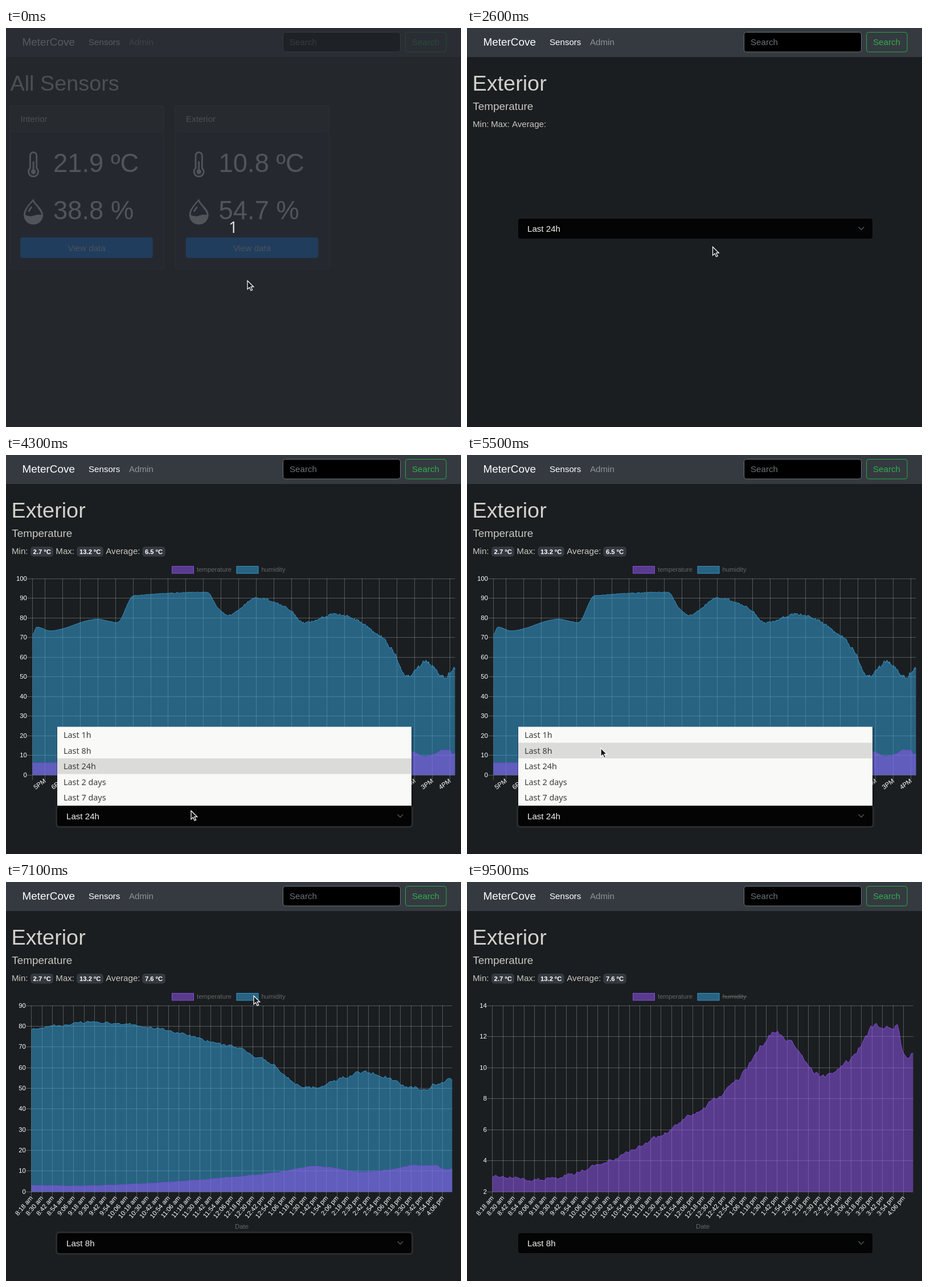
Recreate the animation shown at these times as an HTML page. Size 799 by 701 pixels, loop 9800 ms.

```html
<!DOCTYPE html>
<html lang="en">
<head>
<meta charset="utf-8">
<title>Sensor dashboard</title>
<style>
html, body { margin: 0; width: 100%; height: 100%; overflow: hidden; background: #1a1e20; }
svg { display: block; width: 100%; height: 100%; font-family: "Liberation Sans", Arial, sans-serif; }
text { white-space: pre; }
</style>
</head>
<body>
<svg id="stage" viewBox="0 0 799 701"></svg>
<script>
const LOOP = 9800, STEP = 100;
const BODY = 15.12, SMALL = 11.34, LEAD = 18.9, HEAD = 37.8, BIG = 45.36;
const stage = document.getElementById('stage');

// ---- markup helpers
const text = (x, y, s, size, fill, extra = '') =>
  `<text x="${x}" y="${y}" font-size="${size}" fill="${fill}" ${extra}>${s}</text>`;
const rect = (x, y, w, h, fill, r = 0, extra = '') =>
  `<rect x="${x}" y="${y}" width="${w}" height="${h}" rx="${r}" fill="${fill}" ${extra}/>`;
const path = (d, fill, extra = '') => `<path d="${d}" fill="${fill}" ${extra}/>`;
const group = (id, body) => `<g id="${id}">${body}</g>`;

// ---- page parts
const nav =
  rect(0, 0, 799, 51, '#343a40') +
  text(28.5, 31, 'MeterCove', LEAD, '#fff') +
  text(145, 30, 'Sensors', BODY, '#fff') +
  text(216, 30, 'Admin', BODY, '#919497') +
  rect(486.5, 7.5, 206, 34.5, '#000', 4, 'stroke="#6b7176"') +
  text(498, 30, 'Search', BODY, '#6d7378') +
  rect(701.5, 7.5, 71.5, 34.5, 'none', 4, 'stroke="#28a745"') +
  text(713, 30, 'Search', BODY, '#30ad4c');

// icons live in a 16-unit box; the panel colour cuts out their insides
const INK = '#e6ebe9', PANEL = '#212527', EDGE = 'stroke="#3b4042"';
const icon = (y, body) => `<g transform="translate(25.4 ${y}) scale(${BIG / 16})">${body}</g>`;
const tube = (w, r, top, color) =>
  path(`M8 ${top}V12.5`, 'none', `stroke="${color}" stroke-width="${w}" stroke-linecap="round"`) +
  `<circle cx="8" cy="12.500" r="${r}" fill="${color}"/>`;
const thermometer = tube(5, 3.5, 2.5, INK) + tube(3, 2.5, 2.5, PANEL) + tube(1, 1.5, 6.5, INK);
const droplet =
  path('M8 0C9 3.500 14 6 14 10a6 6 0 0 1-12 0C2 6 6.500 2 8 0z', INK) +
  path('M7.600 1.800C5 4.500 3 7.500 3 10c0 0 2.500 1.500 5 .5s5-.5 5-.5C13 8 10 5 7.600 1.800z', PANEL) +
  path('M5 8Q6 6 7 5', 'none', `stroke="${INK}"`);

const card = (dx, name, temp, hum, id) => `<g transform="translate(${dx} 0)">` +
  rect(6.5, 136.5, 270.5, 286.5, PANEL, 4, EDGE) +
  rect(6.5, 136.5, 270.5, 46, '#272b2c', 4, EDGE) +
  text(25.5, 165, name, BODY, '#cdcac5') +
  icon(217, thermometer) + text(83, 252.5, temp + ' ºC', BIG, INK) +
  icon(300, droplet) + text(83, 335.5, hum + ' %', BIG, INK) +
  rect(25.3, 368, 232.3, 36, '#0a7ff6', 4, `id="${id}"`) +
  text(141.5, 391.5, 'View data', BODY, '#cdd8e0', 'text-anchor="middle"') + '</g>';

const home =
  text(7.5, 109.5, 'All Sensors', HEAD, '#d3d0cb') +
  card(0, 'Interior', '21.9', '38.8', 'btnIn') +
  card(290.6, 'Exterior', '10.8', '54.7', 'btnOut');

const status = rect(-5, 695, 270, 20, '#fbfbfa', 3) +
  text(8, 708.5, 'sensors-home.example/data/exterior/2', 13, '#333', 'font-family="Noto Sans, sans-serif"');

const badge = (x, w, s, id = '') => rect(x, 161, w, 17.5, '#343a40', 5) +
  text(x + 4.6, 173.6, s, SMALL, '#fff', `font-weight="bold" id="${id}"`);
const label = (x, s) => text(x, 174, s, BODY, '#cac7c2');

const detail =
  text(9.5, 109.5, 'Exterior', HEAD, '#d3d0cb') +
  text(10.3, 144, 'Temperature', LEAD, '#c9c6c0') +
  label(10, 'Min:') +
  group('waiting', label(42, 'Max:') + label(79, 'Average:')) +
  group('stats', label(87.3, 'Max:') + label(175.3, 'Average:') +
    badge(43, 40, '2.7 ºC') + badge(124.3, 46.5, '13.2 ºC') + badge(239.3, 40.5, '6.5 ºC', 'avg')) +
  group('chart', '') +
  group('select',
    rect(87, 614, 628, 41, '#292c2e', 6, 'id="ring"') +
    rect(90, 617, 622, 35, '#040404', 4) +
    text(106, 640, 'Last 24h', BODY, '#f2f2f0', 'id="choice"') +
    path('M687.5 631.5l4.8 4.8 4.8-4.8', 'none', 'stroke="#4a5055" stroke-width="1.6"'));

const ROW = 27.5, MENU = 478;
const menu =
  rect(89, MENU, 626, 140, '#000', 2, 'opacity=".25"') +
  rect(90, MENU - .5, 622, 138.5, '#f9f9f7') +
  rect(90, MENU, 622, ROW, '#dbdbda', 0, 'id="hot"') +
  ['1h', '8h', '24h', '2 days', '7 days'].map((r, i) => text(101, 497 + i * ROW, 'Last ' + r, 14.4,
    '#3b3b3b', 'font-family="Noto Sans, Open Sans, sans-serif"')).join('');

const arrow = path('M.5 .5V15.4L4 12.2L6.6 17.8L9.1 16.7L6.6 11.2H11.3z', '#14171a',
  'stroke="#fff" stroke-width="1.2"');
const hand =
  path('M-1 1Q.3-.8 1.600 1V6Q3 5 4.300 6.500Q6 6 7 7.500Q9 7 9.500 9V12.500L8.500 17H.6L-4 10.500Q-3.500 8-1 10z',
    '#fff', 'stroke="#111" stroke-width="1.1"') +
  path('M2 10.500V14M4.500 10.500V14M7 10.500V14', 'none', 'stroke="#111" stroke-width=".8"');

stage.innerHTML = nav + group('home', home) + group('detail', detail) + group('menu', menu) +
  group('status', status) +
  group('dim', rect(0, 0, 799, 701, 'rgb(39,43,50)', 0, 'opacity=".775"') +
    text(399, 360, '1', 28, '#e4e6e6', 'text-anchor="middle" font-family="Open Sans, sans-serif"')) +
  group('arrow', arrow) + group('hand', hand);
const el = id => document.getElementById(id);
const show = (id, on) => el(id).setAttribute('display', on ? 'inline' : 'none');
const set = (id, name, v) => el(id).setAttribute(name, v);

// ---- readings: a monotone curve through [hour, value] turning points, plus noise that grows
const humKeys = [[0, 71.5], [.25, 75.3], [1, 73.4], [3.7, 79.3], [4.8, 77.6], [5.75, 91.2], [9.9, 93],
  [10.6, 84.2], [11.1, 81.4], [12.75, 90], [14.5, 85], [15.4, 77.6], [17.3, 82], [19.8, 70],
  [20.6, 61.5], [21.2, 50], [22.4, 57.7], [23.4, 49.8], [24, 54.7]];
const tempKeys = [[0, 6.1], [4.8, 6.6], [5.5, 5.1], [6, 6.1], [10.3, 7.5], [15.5, 3.2], [17, 2.8], [18, 3.7],
  [20.6, 8.9], [21.4, 12.2], [22.35, 9.4], [22.8, 10.4], [23.3, 12.7], [23.7, 12.7], [23.83, 10.8], [24, 10.8]];

function curve(keys) {
  const rise = i => (keys[i + 1][1] - keys[i][1]) / (keys[i + 1][0] - keys[i][0]);
  const slope = i => {
    if (i === 0 || i === keys.length - 1) return 0;
    const a = rise(i - 1), b = rise(i);
    return a * b > 0 ? 2 * a * b / (a + b) : 0;
  };
  return h => {
    let i = 0;
    while (i < keys.length - 2 && keys[i + 1][0] < h) i++;
    const [h0, v0] = keys[i], [h1, v1] = keys[i + 1], w = h1 - h0;
    const u = (h - h0) / w, s = u * u * (3 - 2 * u);
    return v0 + (v1 - v0) * s + w * u * (1 - u) * (slope(i) * (1 - u) - slope(i + 1) * u);
  };
}
let seed = 41;
const random = () => (seed = (seed * 16807) % 2147483647) / 2147483647 - .5;
const COUNT = 720;
function readings(keys, amp) {
  const at = curve(keys);
  let drift = 0;
  return Array.from({ length: COUNT }, (_, i) => {
    const h = 24 * i / (COUNT - 1);
    drift = drift * .5 + random();
    return at(h) + drift * amp * (h / 24) ** 1.5;
  });
}
const hum = readings(humKeys, 2), temp = readings(tempKeys, .4);

// ---- chart
const TOP = 217;
const PURPLE = ['rgba(152,88,250,.5)', '#824bd6'], BLUE = ['rgba(54,168,227,.5)', '#3793c8'];
const hour = h => h % 12 || 12;
const dayTick = i => {
  const h = (17 + i) % 24;
  return hour(h) + (h < 12 ? 'AM' : 'PM');
};
const shiftTick = i => {
  const m = 498 + i * 12, h = Math.floor(m / 60);
  return `${hour(h)}:${String(m % 60).padStart(2, '0')} ${h < 12 ? 'am' : 'pm'}`;
};
const day = { left: 46.5, right: 788.5, bottom: 562.3, samples: COUNT, min: 0, max: 100, by: 10,
  first: 68.5, gap: 30.92, ticks: 24, name: dayTick, turn: -36 };
const shift = { left: 44.5, right: 783.5, bottom: 544.2, samples: 240, min: 0, max: 90, by: 10,
  first: 44.5, gap: 18.515, ticks: 40, name: shiftTick, turn: -50 };
const views = [
  { ...day, at: 2900, start: 2870 },
  { ...shift, at: 6000, start: 5983 },
  { ...shift, at: 7700, start: 7680, min: 2, max: 14, by: 2, solo: true }
];
const yOf = (view, v) => view.bottom - (v - view.min) / (view.max - view.min) * (view.bottom - TOP);
const snap = v => Math.floor(v) + .5;

const legend = (x, name, [fill, line], struck) =>
  rect(x, 195.5, 38, 12.5, fill, 0, `stroke="${line}"`) +
  text(x + 43.5, 205, name, SMALL, '#666') +
  (struck ? path(`M${x + 43.5} 201.5h43`, 'none', 'stroke="#666"') : '');
const area = (id, [fill, line]) => path('', fill, `id="${id}Fill"`) +
  path('', 'none', `id="${id}Line" stroke="${line}" stroke-linejoin="round"`);

function frame(view) {
  const { left, right, bottom } = view;
  let grid = `M${left} ${TOP}V${bottom + 9}`, labels = '';
  for (let v = view.min; v <= view.max; v += view.by) {
    const y = snap(yOf(view, v));
    grid += `M${left - 9.5} ${y}H${right}`;
    labels += text(left - 9.7, y + 3, v, SMALL, '#fff', 'text-anchor="end"');
  }
  for (let i = 0; i < view.ticks; i++) {
    const x = view.first + i * view.gap;
    if (x > left) grid += `M${snap(x)} ${TOP}V${bottom + 9}`;
    labels += text(0, 4, view.name(i), SMALL, '#fff',
      `text-anchor="end" transform="translate(${x} ${bottom + 8.7}) rotate(${view.turn})"`);
  }
  return path(grid, 'none', 'stroke="#fff" stroke-opacity=".25"') + labels +
    text((left + right) / 2, 608.5, 'Date', SMALL, '#666', 'text-anchor="middle"') +
    legend(291.5, 'temperature', PURPLE) + legend(405, 'humidity', BLUE, view.solo) +
    area('hum', BLUE) + area('temp', PURPLE);
}
function plot(id, data, view, ease) {
  const { left, right, bottom, samples } = view;
  const points = data.slice(-samples).map((v, i) => {
    const from = view.solo ? yOf(shift, v) : bottom;
    const x = left + (right - left) * i / (samples - 1);
    return x.toFixed(1) + ' ' + (from + (yOf(view, v) - from) * ease).toFixed(2);
  }).join('L');
  set(id + 'Line', 'd', 'M' + points);
  set(id + 'Fill', 'd', `M${left} ${bottom}L${points}L${right} ${bottom}z`);
}
let current;
function drawChart(t) {
  const view = views.filter(v => t >= v.at).pop();
  if (view !== current) {
    current = view;
    el('chart').innerHTML = view ? frame(view) : '';
  }
  if (!view) return;
  const ease = 1 - (1 - Math.min(1, (t - view.start) / 1000)) ** 4;
  if (!view.solo) plot('hum', hum, view, ease);
  plot('temp', temp, view, ease);
}

// ---- pointer moves: from, until, x, y
const moves = [
  [700, 900, 440, 424], [1000, 1500, 431, 384], [3500, 4000, 324.5, 624.5], [4800, 4900, 317, 605.5],
  [5000, 5500, 234.5, 514.5], [6200, 7100, 434.5, 199.5], [9200, 9400, 165, 9]
];
function pointer(t) {
  let x = 423.5, y = 443.5;
  for (const [from, until, toX, toY] of moves) {
    const f = Math.max(0, Math.min(1, (t - from) / (until - from)));
    x += (toX - x) * f;
    y += (toY - y) * f;
  }
  return [x, y];
}

function draw(t) {
  const within = (a, b) => t >= a && t < b;
  const [x, y] = pointer(t);
  show('dim', t < 200);
  show('home', t < 2400);
  show('detail', t >= 2400);
  show('status', within(1400, 2500));
  set('btnOut', 'fill', within(1300, 2400) ? '#0a6ad0' : '#0a7ff6');
  show('waiting', t < 2900);
  show('stats', t >= 2900);
  el('avg').textContent = t < 6000 ? '6.5 ºC' : '7.6 ºC';
  el('choice').textContent = t < 6000 ? 'Last 24h' : 'Last 8h';
  set('select', 'transform', `translate(0 ${t < 2900 ? -282 : 0})`);
  show('ring', within(4200, 7700));
  show('menu', within(4200, 5800));
  const row = t < 5100 ? 2 : Math.max(0, Math.min(4, Math.floor((y - MENU) / ROW)));
  set('hot', 'y', MENU + row * ROW);
  drawChart(t);
  const onLink = within(1300, 2600);
  show('hand', onLink);
  show('arrow', !onLink && !within(200, 600) && t < 9500);
  set(onLink ? 'hand' : 'arrow', 'transform', `translate(${x} ${y})`);
}

const begin = performance.now();
let last = 0;
function tick(now) {
  const t = Math.floor((Math.max(0, now - begin) % LOOP) / STEP) * STEP;
  if (t !== last) draw(last = t);
  requestAnimationFrame(tick);
}
draw(0);
requestAnimationFrame(tick);
</script>
</body>
</html>
```
